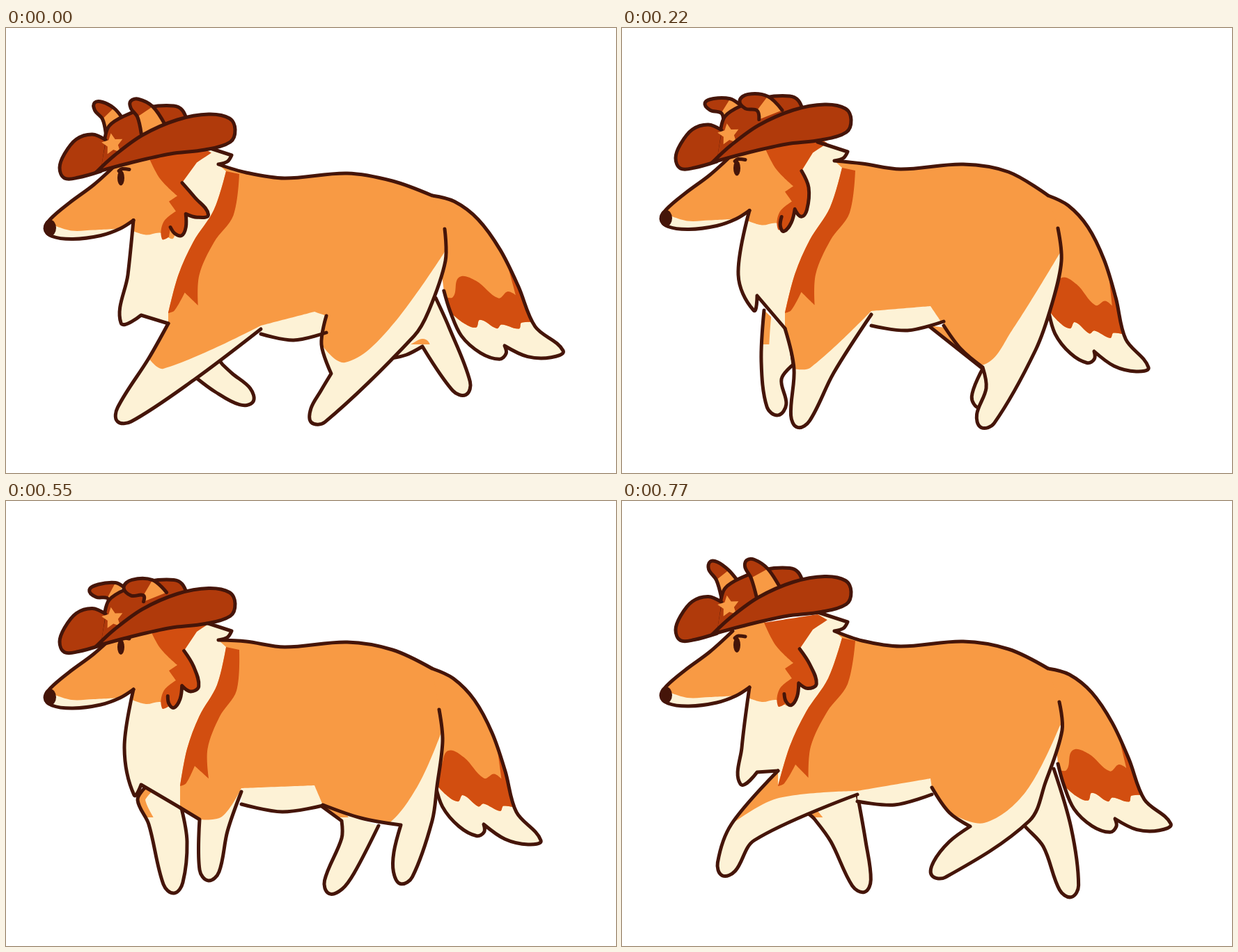
An HTML page with a canvas for the animation above (0.88 s loop, 876x640 px).

```html
<!DOCTYPE html>
<html lang="en">
<head>
<meta charset="utf-8">
<title>Trotting collie</title>
<style>
html, body { margin: 0; width: 100%; height: 100%; overflow: hidden; background: #fff; }
canvas { display: block; }
</style>
</head>
<body>
<canvas id="stage" width="876" height="640"></canvas>
<script>
const ctx = document.getElementById('stage').getContext('2d');
const ORANGE = '#f89a44', CREAM = '#fdf2d6', RUST = '#d24e10', HAT = '#b03a0b', INK = '#451509';
const STEP = 110, PAW = 14;

const at = (x, y, corner = false) => ({ x, y, corner });
const blend = (a, b, t) => a.map((p, i) => ({ ...p, x: p.x + (b[i].x - p.x) * t, y: p.y + (b[i].y - p.y) * t }));

// Points are "x,y"; a star marks a sharp corner, an o the centre of a paw.
const parse = text => text.split(' ').map(p => {
  const [x, y] = p.split(',').map(v => parseFloat(v));
  return { x, y, corner: p.endsWith('*'), paw: p.endsWith('o') };
});
const parseAll = parts => Object.fromEntries(Object.entries(parts).map(([name, text]) => [name, parse(text)]));

// Legs run from the rear edge over the paw to the front edge; cream gives the sock and thigh markings.
const [reach, plant, push, lift, gather, swing] = [{
  front: '366,433 270,506 170,556o 205,475 233,425',
  hind: '630,289 631,335 607,407 586,443 448,557o 452,522 467,497* 453,455 460,414',
  farFront: '300,470 311,484* 325,497 343,530o 300,523 273,503',
  farHind: '617,388 636,430 654,515o 598,458* 575,470 553,475',
  cream: '226,490 487,481 550,433'
}, {
  front: '358,412 304,496 256,561o 247,490 234,432',
  hind: '626,288 631,335 618,395 594,463 522,562o 523,518 518,488* 487,462 462,428',
  farFront: '240,440 246,484* 229,505 222,543o 200,480 204,406',
  farHind: '540,440 530,495 516,533o 518,490* 484,463 440,428',
  cream: '270,489 520,484 560,435'
}, {
  front: '364,408 375,460 360,551o 331,483 255,436',
  hind: '622,283 627,330 621,410 631,480 621,560o 606,540 584,503* 535,489 462,426',
  farFront: '232,430 155,488 119,527o 130,474 188,402',
  farHind: '535,490 500,502 448,512o 495,463* 470,455 430,434',
  cream: '345,468 545,488 595,410'
}, {
  front: '345,403 352,433 340,480 344,530o 302,470* 248,448',
  hind: '620,300 626,335 615,410 622,475 624,546o 600,533 573,487* 535,481 453,439',
  farFront: '255,450 205,500 125,550o 160,465 195,424',
  farHind: '540,480 475,530 424,551o 465,476* 448,436',
  cream: '325,460 540,477 600,405'
}, {
  front: '338,418 318,475 292,532o 278,458* 250,441',
  hind: '622,300 627,345 619,410 612,460 570,537o 557,505 567,466* 510,456 455,437',
  farFront: '252,442 260,490 240,550o 205,465 189,430 200,412',
  farHind: '535,467 500,535 470,552o 482,485 482,460* 452,438',
  cream: '310,454 540,470 590,412'
}, {
  front: '338,422 190,488 150,526o 157,465 224,388',
  hind: '628,289 632,330 608,405 585,460 456,530o 470,490 500,468* 470,448 445,412',
  farFront: '338,422 350,490 344,549o 300,490 276,457 268,450',
  farHind: '620,385 645,470 642,556o 605,497 578,467 570,455',
  cream: '222,428 520,463 580,418'
}].map(parseAll);

const between = (a, b, t) => Object.fromEntries(Object.keys(a).map(part => [part, blend(a[part], b[part], t)]));
const strides = [reach, between(reach, plant, 0.55), plant, push, lift, gather, between(gather, swing, 0.4), swing];

const head = parseAll({
  snout: '163,194 130,224 95,250 68,273 60,287 70,298 100,302 140,297 168,287 187,275',
  cheek: '185,290 205,296 225,293 245,300 250,240 205,176',
  muzzle: '168,287 130,289 98,290 72,282',
  fluffBack: '257,221 275,242 294,267 278,271 262,266* 262,285 256,297 246,294 240,285',
  fluffDown: '262,218 272,242 269,274 261,284 252,273* 247,292 236,305 231,297 233,284',
  fluffEdge: '238,299 228,302 230,278 248,262* 238,248* 250,240* 225,215 208,182* 285,170* 299,178* 278,192'
});

const hat = parseAll({
  left: '147,158 128,150 105,157 88,178 81,198 88,213 108,212 140,203',
  right: '134,204 160,180 200,151 250,129 295,121 325,127 333,143 326,161 290,172 240,178 190,189 134,204',
  crown: '138,200 145,160 152,138 175,123 210,111 245,109 257,115 264,130',
  earL: '147,150 136,127 120,113 121,102 132,102 153,112 170,126',
  earLFlat: '151,142 151,136 135,136 124,126 137,117 162,113 173,118',
  earR: '198,151 186,124 172,110 173,100 184,98 209,110 232,137',
  earRFlat: '202,139 203,132 185,134 173,122 185,110 215,109 235,126'
});

const tail = parseAll({
  anchors: '612,241 803,473 716,459',
  outline: '612,241 645,252 680,280 712,325 738,378 762,436 803,473 785,481 750,477 716,459* 718,470 708,477 680,466 652,440 636,405 627,375',
  bandTop: '622,380 640,385 650,358 675,365 708,392 722,384 734,390* 722,345*',
  bandLow: '775,432 742,429 738,437 712,429 705,434 680,420 674,430 655,422 630,400'
});

const stripe = parseAll({
  anchors: '320,204 233,417 339,209',
  left: '318,204 300,262 270,310 248,360 233,417',
  right: '233,417 242,413 257,386* 276,405* 278,360 300,310 328,270 337,208'
});

function direction(list, i) {
  const before = list[i - 1], after = list[i + 1];
  if (!before || !after || list[i].corner) return at(0, 0);
  const dx = after.x - before.x, dy = after.y - before.y, length = Math.hypot(dx, dy) || 1;
  return at(dx / length, dy / length);
}

// Smooth curve through each list; consecutive lists are joined by straight lines.
function curve(...lists) {
  const path = new Path2D();
  lists.forEach((list, k) => list.forEach((p, i) => {
    if (!i) return k ? path.lineTo(p.x, p.y) : path.moveTo(p.x, p.y);
    const q = list[i - 1], a = direction(list, i - 1), b = direction(list, i);
    const pull = Math.hypot(p.x - q.x, p.y - q.y) / 3;
    path.bezierCurveTo(q.x + a.x * pull, q.y + a.y * pull, p.x - b.x * pull, p.y - b.y * pull, p.x, p.y);
  }));
  return path;
}

function fill(color, ...lists) {
  ctx.fillStyle = color;
  ctx.fill(curve(...lists));
}

const line = list => ctx.stroke(curve(list));

function clipped(paint, ...lists) {
  ctx.save();
  ctx.clip(curve(...lists));
  paint();
  ctx.restore();
}

function shifted(offset, paint) {
  ctx.save();
  ctx.translate(offset.x, offset.y);
  paint();
  ctx.restore();
}

// Affine map that carries three anchors onto three new places.
function warp(list, [o, a, b], [to, ta, tb]) {
  const ax = a.x - o.x, ay = a.y - o.y, bx = b.x - o.x, by = b.y - o.y, det = ax * by - ay * bx;
  return list.map(p => {
    const x = p.x - o.x, y = p.y - o.y;
    const u = (x * by - y * bx) / det, v = (ax * y - ay * x) / det;
    return {
      ...p,
      x: to.x + u * (ta.x - to.x) + v * (tb.x - to.x),
      y: to.y + u * (ta.y - to.y) + v * (tb.y - to.y)
    };
  });
}

// Replaces the paw centre by a rounded end that continues the shin.
function limb(list) {
  return list.flatMap((p, i) => {
    if (!p.paw) return p;
    const a = list[i - 1], b = list[i + 1];
    const dx = p.x - (a.x + b.x) / 2, dy = p.y - (a.y + b.y) / 2, scale = PAW / Math.hypot(dx, dy);
    const x = dx * scale, y = dy * scale;
    const side = Math.sign((b.x - a.x) * y - (b.y - a.y) * x);
    return [at(p.x - y * side, p.y + x * side), at(p.x + x, p.y + y), at(p.x + y * side, p.y - x * side)];
  });
}

// The trunk, head and tail bob twice per stride.
function pose(index) {
  const phase = index * Math.PI / 2;
  const wave = (mean, c, s) => mean + c * Math.cos(phase) + s * Math.sin(phase);
  const { front, hind, farFront, farHind, cream } = strides[index];
  const headShift = at(-4, wave(-5.5, 7, 1.5));
  const elbow = front[0], shoulder = front.at(-1), groin = hind.at(-1), jaw = head.snout.at(-1);
  const nape = at(324, wave(180.5, 2.5, 6.5)), saddle = wave(209.5, 6.5, 0.5);
  const fromNape = (x, y, corner) => at(nape.x + x, nape.y + y, corner);
  const back = [
    fromNape(-43, -14), fromNape(0, 0, true), fromNape(-6, 9), fromNape(-19, 13, true),
    at(345, saddle - 8), at(400, saddle), at(490, saddle - 7), at(555, saddle + 4), at(612, 241)
  ];
  const bellyRear = wave(430, 8, 8), bellyFront = wave(434, 6, 2);
  const belly = [
    at(groin.x, bellyRear),
    at((groin.x + elbow.x) / 2, (bellyRear + bellyFront) / 2 + 10),
    at(elbow.x, bellyFront)
  ];
  const chest = [
    shoulder, at(194, wave(399, 14, 9), true), at(wave(177, -12, 7), wave(415, 9, 8)),
    at(wave(171, 4, -1), 355), at(jaw.x + headShift.x, jaw.y + headShift.y)
  ];
  const [sock, thighLow, thigh] = cream;
  const creamEdge = [
    front.at(-2), sock, at(elbow.x, elbow.y - 5, true), at(443, wave(404, 4, 5), true),
    { ...groin, corner: true }, { ...hind.at(-2), corner: true }, thighLow, thigh, at(628, 325)
  ];
  const stripePlace = [fromNape(-6, 23), at(shoulder.x, 410), fromNape(13, 28)];
  const tailPlace = [
    at(612, 241),
    at(wave(778, 22, -10), wave(476, -12, 12)),
    at(wave(697, 19, -11), wave(461, -4, 4))
  ];
  return {
    back, belly, chest, creamEdge, headShift,
    front: limb(front), hind: limb(hind), farLegs: [limb(farFront), limb(farHind)],
    stripeL: warp(stripe.left, stripe.anchors, stripePlace),
    stripeR: warp(stripe.right, stripe.anchors, stripePlace),
    tail: warp(tail.outline, tail.anchors, tailPlace),
    bandTop: warp(tail.bandTop, tail.anchors, tailPlace),
    bandLow: warp(tail.bandLow, tail.anchors, tailPlace),
    fluff: blend(head.fluffBack, head.fluffDown, wave(0.48, -0.5, 0.05)),
    hatShift: at(-4, wave(-4, 7, 8.5)),
    earFlop: wave(0.4, -0.3, 0.5),
    earLean: wave(5, 5, -5)
  };
}

function drawFarLeg(leg) {
  fill(CREAM, leg);
  clipped(() => {
    ctx.save();
    ctx.beginPath();
    ctx.rect(0, 0, 876, 455);
    ctx.clip();
    ctx.strokeStyle = ORANGE;
    ctx.lineWidth = 22;
    line(leg.slice(-3));
    ctx.restore();
  }, leg);
  line(leg);
}

function drawTail({ tail, bandTop, bandLow }) {
  fill(ORANGE, tail);
  clipped(() => {
    fill(CREAM, bandLow, parse('560,420 560,620 860,620 860,430'));
    fill(RUST, bandTop, bandLow);
  }, tail);
  line(tail);
}

function drawBody({ back, hind, belly, front, chest, creamEdge, stripeL, stripeR }) {
  const outline = [back, hind, belly, front, chest];
  fill(ORANGE, ...outline);
  clipped(() => {
    fill(CREAM, creamEdge, parse('650,290 876,300 876,640 0,640'));
    fill(CREAM, back.slice(0, 4), stripeL, chest);
    fill(RUST, stripeL, stripeR);
  }, ...outline);
}

function ellipse(x, y, rx, ry) {
  ctx.fillStyle = INK;
  ctx.beginPath();
  ctx.ellipse(x, y, rx, ry, 0, 0, Math.PI * 2);
  ctx.fill();
}

function drawHead(fluff) {
  fill(ORANGE, head.snout, head.cheek);
  fill(CREAM, head.muzzle, head.snout.slice(5, 9));
  fill(RUST, fluff, head.fluffEdge);
  line(head.snout);
  line(fluff);
  ellipse(67, 286, 9, 12);
  ellipse(169, 214, 5, 11);
  line(parse('166,204 171,201 181,202'));
}

// Blends an upright ear with its flattened shape and leans the tip.
function drawEar(upright, flat, flop, lean) {
  const ear = blend(upright, flat, flop);
  ear.forEach((p, i) => { p.x += lean * Math.min(1, i / 2, (6 - i) / 2); });
  fill(ORANGE, ear);
  fill(HAT, ear.slice(1, 6));
  line(ear);
}

function drawStar(x, y, radius) {
  ctx.fillStyle = ORANGE;
  ctx.beginPath();
  for (let i = 0; i < 10; i++) {
    const angle = i * Math.PI / 5 - Math.PI / 2 - 0.15, r = i % 2 ? radius * 0.5 : radius;
    ctx.lineTo(x + r * Math.cos(angle), y + r * Math.sin(angle));
  }
  ctx.fill();
}

function hatPart(list) {
  fill(HAT, list);
  line(list);
}

function drawHat({ earFlop, earLean }) {
  drawEar(hat.earL, hat.earLFlat, earFlop, earLean);
  hatPart(hat.crown);
  drawEar(hat.earR, hat.earRFlat, earFlop, earLean);
  hatPart(hat.left);
  drawStar(157, 164, 16);
  hatPart(hat.right);
}

function draw(dog) {
  ctx.fillStyle = '#fff';
  ctx.fillRect(0, 0, 876, 640);
  ctx.strokeStyle = INK;
  ctx.lineWidth = 5;
  ctx.lineCap = ctx.lineJoin = 'round';
  dog.farLegs.forEach(drawFarLeg);
  drawTail(dog);
  drawBody(dog);
  shifted(dog.headShift, () => drawHead(dog.fluff));
  for (const part of ['back', 'hind', 'belly', 'front', 'chest']) line(dog[part]);
  shifted(dog.hatShift, () => drawHat(dog));
}

const start = performance.now();
function tick() {
  const elapsed = performance.now() - start;
  draw(pose(Math.floor(elapsed / STEP) % strides.length));
  requestAnimationFrame(tick);
}
tick();
</script>
</body>
</html>
```
